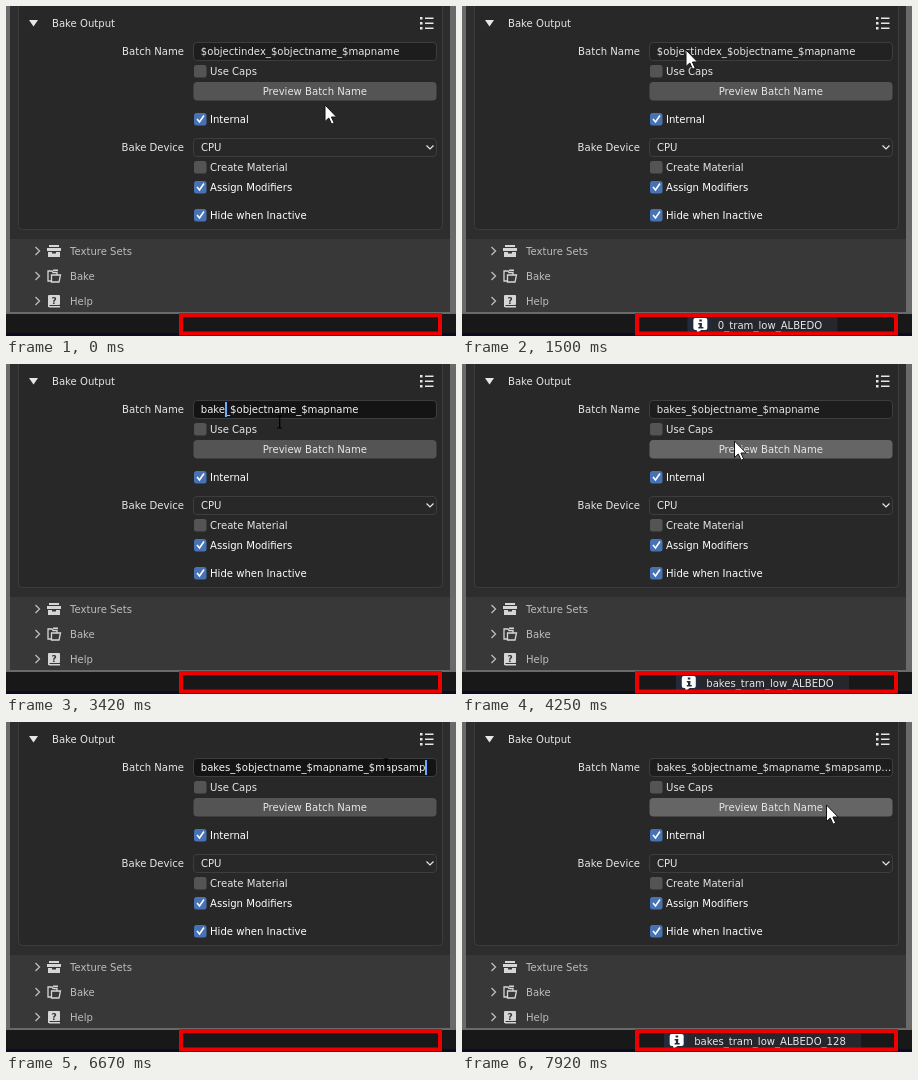
Animation, 450 px wide and 330 px high, one loop 8 s. Source, as an HTML page with a canvas:

```html
<!DOCTYPE html>
<html lang="en">
<head>
<meta charset="utf-8">
<title>Bake Output</title>
<style>
  html, body { margin: 0; width: 100%; height: 100%; overflow: hidden; background: #181818; }
  canvas { display: block; }
</style>
</head>
<body>
<canvas id="stage" width="450" height="330"></canvas>
<script>
const ctx = document.getElementById('stage').getContext('2d');
const LOOP = 8000, TICK = 1000 / 12;
const FONT = '10.08px "DejaVu Sans", sans-serif';
const LIGHT = '#e6e6e6', BLUE = '#4772b3', EDGE = '#6a6a6a', NAVY = '#222a3c';
const FIELD_X = 194.8;

// Pointer path: time, x, y
const path = [
  [0, 319, 99], [250, 312, 85], [1000, 312, 85], [1330, 238, 60], [1500, 224, 44],
  [1750, 201, 45], [2170, 262, 46], [2250, 273.5, 58], [3660, 273.5, 58], [3830, 272.5, 77],
  [4600, 272.5, 77], [4920, 380, 43], [7420, 380, 43], [7670, 364.5, 83], [LOOP, 364.5, 83]
];
const presses = [580, 3830, 7670];
const editing = [[1580, 3660], [5000, 7420]];
const reports = [
  [670, 3330, '0_tram_low_ALBEDO'],
  [3920, 6420, 'bakes_tram_low_ALBEDO'],
  [7750, LOOP, 'bakes_tram_low_ALBEDO_128']
];

// Field contents over time: time, text, caret, selection anchor
const edits = [];
const REST = '_$objectname_$mapname';
const START = '$objectindex' + REST;
edits.push([0, START, 0, 0], [1580, START, START.length, 0], [1750, START, 'drag', 1],
  [2420, '$' + REST, 1, 1], [2830, REST, 0, 0]);
[3000, 3170, 3250, 3420, 3500].forEach((t, i) =>
  edits.push([t, 'bakes'.slice(0, i + 1) + REST, i + 1, i + 1]));
const BAKES = 'bakes' + REST, TAIL = '_$mapsamples';
edits.push([5000, BAKES, BAKES.length, 0], [5170, BAKES, BAKES.length, BAKES.length]);
[5420, 5580, 5670, 5750, 5920, 6170, 6330, 6500, 6670, 6750, 6920, 7080].forEach((t, i) => {
  const s = BAKES + TAIL.slice(0, i + 1);
  edits.push([t, s, s.length, s.length]);
});

const within = (t, a, b) => t >= a && t < b;
const measure = s => ctx.measureText(s).width;

function rect(x, y, w, h, fill) {
  ctx.fillStyle = fill;
  ctx.fillRect(x, y, w, h);
}

function round(x, y, w, h, r, fill, stroke) {
  ctx.beginPath();
  ctx.roundRect(x, y, w, h, r);
  if (fill) { ctx.fillStyle = fill; ctx.fill(); }
  if (stroke) { ctx.strokeStyle = stroke; ctx.lineWidth = 1; ctx.stroke(); }
}

function poly(points, fill, stroke, width = 1, close = true) {
  ctx.beginPath();
  points.forEach(([x, y]) => ctx.lineTo(x, y));
  if (close) ctx.closePath();
  if (fill) { ctx.fillStyle = fill; ctx.fill(); }
  if (stroke) { ctx.strokeStyle = stroke; ctx.lineWidth = width; ctx.stroke(); }
}

function text(s, x, y, color = LIGHT, align = 'left') {
  ctx.font = FONT;
  ctx.textAlign = align;
  ctx.fillStyle = color;
  ctx.fillText(s, x, y);
  ctx.textAlign = 'left';
}

function checkbox(y, label, on) {
  round(188, y - 6, 12.5, 12.5, 2.5, on ? BLUE : '#545454');
  if (on) poly([[191, y], [193.5, y + 3], [198, y - 3.5]], null, '#fff', 1.6, false);
  text(label, 204, y + 4, on ? '#fff' : LIGHT);
}

function sectionIcon(i, y, c) {
  if (i === 0) {
    rect(43, y - 6, 10, 2, c);
    rect(41, y - 3, 14, 3, c);
    rect(42, y + 1, 12, 5, c);
    rect(46, y + 1, 4, 1.5, '#383838');
  } else if (i === 1) {
    poly([[45, y + 5], [42, y + 5], [42, y - 5], [46, y - 5], [47, y - 3.5], [51, y - 3.5], [51, y - 1]],
      null, c, 1.3, false);
    poly([[45.5, y - 1], [54.5, y - 1], [53, y + 6], [45.5, y + 6]], null, c, 1.3);
    rect(47, y - 6.5, 5, 1.5, c);
  } else {
    round(42, y - 6, 12, 10, 1, c);
    rect(43, y + 5, 11, 1.5, c);
    rect(42, y + 3, 1.5, 3, c);
    ctx.font = 'bold 9px "DejaVu Sans", sans-serif';
    ctx.fillStyle = '#383838';
    ctx.fillText('?', 45.4, y + 2.5);
  }
}

function panel() {
  rect(0, 0, 450, 330, '#181818');
  rect(0, 0, 450, 308, EDGE);
  rect(4, 0, 440, 306, '#383838');
  rect(4, 0, 440, 233, '#2d2d2d');
  round(12.5, -8, 424, 231.5, 4, '#282828', '#3c3c3c');
  rect(0, 327, 450, 3, '#0b0b22');

  poly([[23, 14], [32, 14], [27.5, 20.5]], LIGHT);
  text('Bake Output', 46, 21);
  [12, 17, 22].forEach(y => {
    rect(414, y - 1, 2.5, 2.5, LIGHT);
    rect(419, y - .5, 8.5, 1.5, LIGHT);
  });

  text('Batch Name', 178, 49, LIGHT, 'right');
  text('Bake Device', 178, 145, LIGHT, 'right');
  checkbox(65, 'Use Caps', false);
  checkbox(113, 'Internal', true);
  checkbox(161, 'Create Material', false);
  checkbox(181, 'Assign Modifiers', true);
  checkbox(209, 'Hide when Inactive', true);

  round(187.5, 132.5, 243, 18, 3.5, '#282828', '#3d3d3d');
  text('CPU', 195, 145);
  poly([[420.5, 139.5], [424, 143], [427.5, 139.5]], null, LIGHT, 1.2, false);

  ['Texture Sets', 'Bake', 'Help'].forEach((label, i) => {
    const y = 245 + 25 * i;
    poly([[29.5, y - 4], [33.5, y], [29.5, y + 4]], null, '#bdbdbd', 1.3, false);
    sectionIcon(i, y, '#d6d6d6');
    text(label, 64, y + 4, '#bdbdbd');
  });
}

function pointerAt(t) {
  let i = 1;
  while (i < path.length - 1 && path[i][0] <= t) i++;
  const [t0, x0, y0] = path[i - 1], [t1, x1, y1] = path[i];
  const p = Math.min(1, (t - t0) / (t1 - t0)), e = p * p * (3 - 2 * p);
  return [x0 + (x1 - x0) * e, y0 + (y1 - y0) * e];
}

const over = ([x, y], top) => x > 187 && x < 431 && y >= top && y < top + 18;

function field(t, mouse, edit) {
  let [, s, caret, anchor] = edits.filter(e => e[0] <= t).pop();
  const fill = edit ? '#141414' : over(mouse, 36) ? '#222' : '#1d1d1d';
  round(187.5, 36.5, 243, 18, 3.5, fill, '#3d3d3d');
  ctx.font = FONT;
  if (!edit) {
    let shown = s;
    while (measure(shown) > 226) shown = shown.slice(0, -1);
    text(shown === s ? s : shown + '…', FIELD_X, 49);
    return;
  }
  if (caret === 'drag') {
    caret = 1;
    while (caret < 12 && FIELD_X + measure(s.slice(0, caret + 1)) <= mouse[0] + 1) caret++;
  }
  const x = FIELD_X - Math.max(0, measure(s.slice(0, caret)) - 232);
  const cx = x + measure(s.slice(0, caret)), ax = x + measure(s.slice(0, anchor));
  ctx.save();
  ctx.beginPath();
  ctx.rect(190, 36, 239, 19);
  ctx.clip();
  if (ax !== cx) rect(Math.min(ax, cx), 38, Math.abs(cx - ax), 15, BLUE);
  text(s, x, 49, '#f2f2f2');
  rect(Math.round(cx), 38, 2, 15, '#71a8ff');
  ctx.restore();
}

function button(t, mouse) {
  const down = presses.some(p => within(t, p, p + 85));
  round(187.5, 76, 243, 18.5, 4, down ? BLUE : over(mouse, 76) ? '#656565' : '#545454');
  text('Preview Batch Name', 308.8, 89, LIGHT, 'center');
}

function report(t) {
  const r = reports.find(([a, b]) => within(t, a, b));
  if (r) {
    ctx.font = FONT;
    const full = measure(r[2]) + 46, left = 300.5 - full / 2;
    const w = full * Math.min(1, 0.4 + (t - r[0]) / 250);
    ctx.save();
    ctx.beginPath();
    ctx.roundRect(left, 310, w, 17, 3);
    ctx.clip();
    rect(left, 310, full, 17, '#26272d');
    rect(left, 310, 24, 17, NAVY);
    round(left + 6, 312, 14, 12, 2, '#fff');
    poly([[left + 9, 323], [left + 15, 323], [left + 10, 327]], '#fff');
    rect(left + 12, 313.5, 2.5, 2, NAVY);
    rect(left + 11, 317, 3.5, 1.5, NAVY);
    rect(left + 12.2, 317, 2.3, 5, NAVY);
    rect(left + 11, 321, 5, 1.5, NAVY);
    text(r[2], left + 30.5, 323);
    ctx.restore();
  }
  ctx.strokeStyle = '#ee0000';
  ctx.lineWidth = 4;
  ctx.strokeRect(175, 309, 259, 18.5);
}

function pointer([x, y], edit) {
  if (edit) {
    rect(x - .5, y - 6, 1.3, 12, '#000');
    rect(x - 2.5, y - 6.5, 5, 1, '#000');
    rect(x - 2.5, y + 5.5, 5, 1, '#000');
    return;
  }
  const shape = [[0, 0], [0, 16.5], [3.8, 13], [6.6, 19.2], [9.2, 18], [6.4, 12], [11.6, 12]];
  poly(shape.map(([a, b]) => [x + a, y + b]), '#fff', '#141414', 1);
}

function frame(now) {
  const t = Math.floor(((now % LOOP) + 4) / TICK) * TICK;
  const at = t + 8;
  const mouse = pointerAt(t), edit = editing.some(([a, b]) => within(at, a, b));
  panel();
  field(at, mouse, edit);
  button(at, mouse);
  report(at);
  pointer(mouse, edit);
}

const begin = performance.now();
function loop() {
  frame(performance.now() - begin);
  requestAnimationFrame(loop);
}
loop();
</script>
</body>
</html>
```
